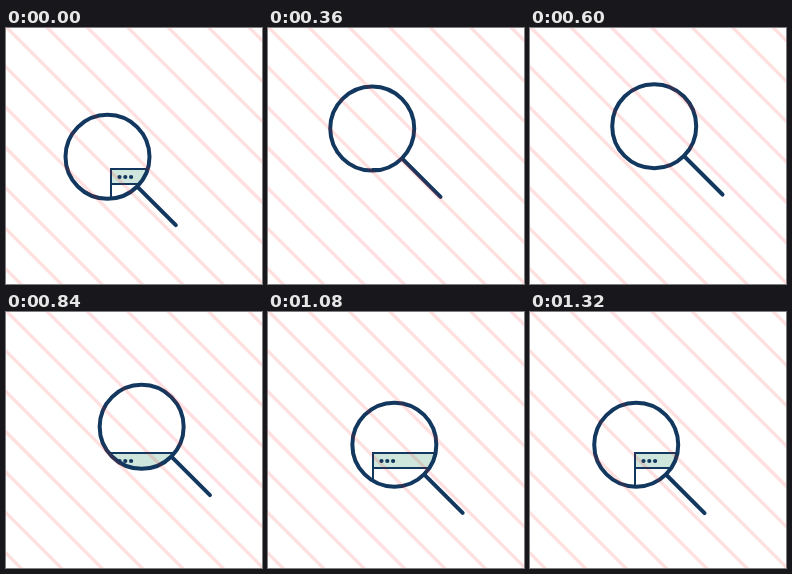
Write an HTML page that moves like this. It is 256x256 px and loops after 1.35 s.

```html
<!DOCTYPE html>
<html lang="en">
<head>
<meta charset="utf-8">
<style>
  html, body { margin: 0; height: 100%; overflow: hidden; background: #fff; }
  svg { display: block; width: 100vw; height: 100vh; }
  .ink { fill: none; stroke: #12385f; stroke-linecap: round; }
</style>
</head>
<body>
<svg viewBox="0 0 256 256">
  <defs>
    <clipPath id="view"><circle id="hole" r="42"/></clipPath>
  </defs>
  <g clip-path="url(#view)">
    <path d="M105 141H210V156H105Z" fill="#cfe6dc"/>
    <path class="ink" stroke-width="2" d="M105 200V141H210M105 156H210"/>
    <path class="ink" stroke-width="4.2" d="M113.5 149h0M119.3 149h0M125.1 149h0"/>
  </g>
  <g id="lens" class="ink" stroke-width="4">
    <circle r="42"/>
    <path d="M30 30L68.3 68.3"/>
  </g>
  <path id="stripes" stroke="#f00" stroke-opacity=".12" stroke-width="3.4"/>
</svg>
<script>
  const LOOP = 1350, STEP = 30;
  const ORBIT = { x: 116.2, y: 116, r: 19.5, start: 138.9, turn: 7.77 };
  const get = id => document.getElementById(id);

  let d = '';
  for (let i = -7; i < 7; i++) d += `M${i * 40.4 + 1.2 - 10} -10l280 280`;
  get('stripes').setAttribute('d', d);

  function draw(now) {
    const step = Math.floor((now % LOOP) / STEP);
    const angle = (ORBIT.start + ORBIT.turn * step) * Math.PI / 180;
    const x = ORBIT.x + ORBIT.r * Math.cos(angle);
    const y = ORBIT.y + ORBIT.r * Math.sin(angle);
    for (const id of ['lens', 'hole']) get(id).setAttribute('transform', `translate(${x} ${y})`);
  }

  const begin = performance.now();
  function tick() {
    draw(performance.now() - begin);
    requestAnimationFrame(tick);
  }
  tick();
</script>
</body>
</html>
```
